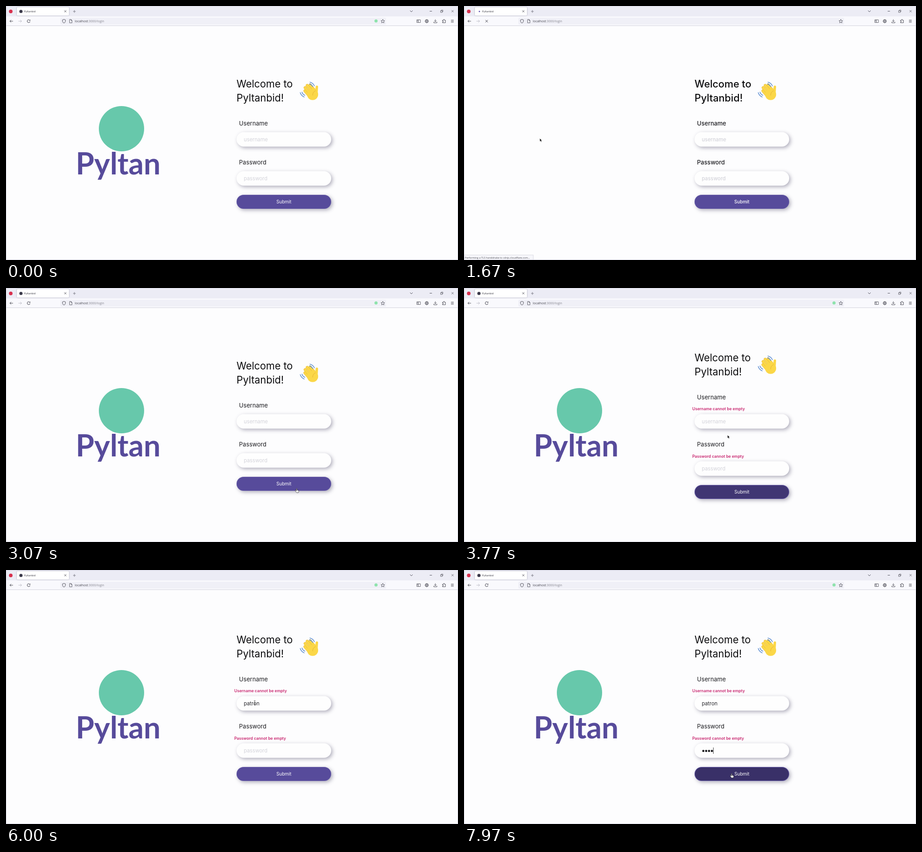
Recreate the animation shown at these times as an HTML page with a canvas. Size 998x561 px, loop 8 s.

```html
<!DOCTYPE html>
<html lang="en">
<head>
<meta charset="utf-8">
<title>Login page</title>
<style>
  html, body { margin: 0; width: 100%; height: 100%; overflow: hidden; background: #fdfdfe; }
  canvas { display: block; width: 998px; height: 561px; }
</style>
</head>
<body>
<canvas id="stage"></canvas>
<script>
const W = 998, H = 561, LOOP = 8000;
const canvas = document.getElementById('stage');
const ctx = canvas.getContext('2d');
const dpr = window.devicePixelRatio || 1;
canvas.width = W * dpr;
canvas.height = H * dpr;

const UI = '"Open Sans", "Noto Sans", sans-serif';
const PAGE = 'Inter, sans-serif';
const INK = '#3f3f4a';

// Key moments in ms
const RELOAD = 890, BLANK = 1340, FORM = 1430, STATUS = 1480, LOADED = 1740;
const REJECTED = 3370;
const userKeys = [4800, 4930, 5050, 5200, 5300, 5430];
const passKeys = [6570, 6600, 6640, 6700];
const FOCUS_USER = 4420, FOCUS_PASS = 6200;
const userName = 'patron';

// Pointer path: time, x, y; a repeated place is a rest
const path = [
  [400, 2, 150], [830, 50, 33], [960, 50, 33], [1670, 167, 292],
  [2470, 531, 308], [2920, 646, 452], [3070, 642, 443], [3420, 638, 440],
  [3570, 638, 440], [3770, 582, 325], [4400, 548, 292], [5990, 548, 292],
  [6200, 686, 400], [7000, 686, 400], [7880, 591, 450], [7970, 591, 450]
];

const clamp = v => Math.max(0, Math.min(1, v));
const smooth = v => { v = clamp(v); return v * v * (3 - 2 * v); };
const count = (times, t) => times.filter(k => t >= k).length;
const within = (t, a, b) => t >= a && t < b;

// Speed through a path point, zero where the pointer rests
function speed(i, axis) {
  const a = path[i - 1], p = path[i], b = path[i + 1];
  if (!a || !b || a[1] === p[1] || b[1] === p[1]) return 0;
  return (b[axis] - a[axis]) / (b[0] - a[0]);
}

function pointerAt(t) {
  if (t < path[0][0] || within(t, userKeys[0], 5850) || within(t, passKeys[0], 7000)) return null;
  let i = 0;
  while (i < path.length - 2 && t >= path[i + 1][0]) i++;
  const span = path[i + 1][0] - path[i][0];
  const u = clamp((t - path[i][0]) / span), s = smooth(u), v = 1 - u;
  const along = axis => path[i][axis] * (1 - s) + path[i + 1][axis] * s
    + span * u * v * (speed(i, axis) * v - speed(i + 1, axis) * u);
  return { x: along(1), y: along(2) };
}

function text(str, x, y, font, color, align = 'left') {
  ctx.font = font;
  ctx.fillStyle = color;
  ctx.textAlign = align;
  ctx.fillText(str, x, y);
}

function rect(x, y, w, h, color) {
  ctx.fillStyle = color;
  ctx.fillRect(x, y, w, h);
}

function pill(x, y, w, h, r, color) {
  ctx.beginPath();
  ctx.roundRect(x, y, w, h, r);
  ctx.fillStyle = color;
  ctx.fill();
}

function dot(x, y, r, color) {
  ctx.beginPath();
  ctx.arc(x, y, r, 0, Math.PI * 2);
  ctx.fillStyle = color;
  ctx.fill();
}

function ring(x, y, r, a, b, color = INK, w = 0.9) {
  ctx.beginPath();
  ctx.arc(x, y, r, a, b);
  ctx.strokeStyle = color;
  ctx.lineWidth = w;
  ctx.stroke();
}

function draw(d, x, y, stroke = INK, w = 0.9, fill) {
  ctx.save();
  ctx.translate(x, y);
  const p = new Path2D(d);
  if (fill) { ctx.fillStyle = fill; ctx.fill(p); }
  if (stroke) { ctx.strokeStyle = stroke; ctx.lineWidth = w; ctx.stroke(p); }
  ctx.restore();
}

const CROSS = 'M-2.3-2.3 2.3 2.3M2.3-2.3-2.3 2.3';
const ARROW = 'M3.5 0H-3.5M-.5-3-3.5 0-.5 3';

function browser(t) {
  const loading = within(t, RELOAD, LOADED);
  rect(0, 0, W, 23, '#ececf5');
  rect(0, 23, W, 20, '#f9f9fd');
  rect(0, 43, W, 1, '#d2d2dc');

  // Tab strip
  dot(10.5, 12, 4, '#d8324f');
  ctx.save();
  ctx.shadowColor = 'rgba(70,70,100,.45)';
  ctx.shadowBlur = 3 * dpr;
  pill(24, 2.5, 115, 18.5, 2, '#fff');
  ctx.restore();
  if (loading) dot(34 + 2.5 * Math.sin((t - 1670) / 800 * Math.PI * 2), 12, 1.5, '#5b4bb0');
  else dot(33, 12, 3.6, '#3a394a');
  text('Pyltanbid', 40, 14.2, '5.8px ' + UI, '#33333d');
  draw(CROSS, 131, 11.7, INK, 0.8);
  draw('M-3 0H3M0-3V3', 151, 12, '#666672', 0.8);
  draw('M-3-1.5 0 1.5 3-1.5', 895, 11.5);
  draw('M-2.5 0H2.5', 938, 11.5);
  draw('M-2.5-1H1.2V2.7H-2.5ZM-1-1V-2.5H2.7V1.2H1.2', 962, 11.5, INK, 0.7);
  draw(CROSS, 986, 11.5, INK, 0.7);

  // Toolbar
  draw(ARROW, 12, 33.5);
  ctx.save();
  ctx.translate(62, 0);
  ctx.scale(-1, 1);
  draw(ARROW, 31, 33.5, '#b9b9c3');
  ctx.restore();
  if (loading) draw('M-2.7-2.7 2.7 2.7M2.7-2.7-2.7 2.7', 50, 33.5, INK, 1);
  else {
    ring(50, 33.5, 3.2, 0.2, 5.3, INK, 1);
    draw('M.8-1H3.6V-3.8Z', 50, 33.5, null, 0, INK);
  }
  pill(120, 26, 719, 15, 2.5, '#f0f0f7');
  draw('M0-4 3.3-2.7V0Q3 3 0 4.2-3 3-3.3 0V-2.7Z', 128, 33.5);
  draw('M-2.7-3.7H.8L2.7-1.8V3.7H-2.7ZM.6-3.5V-1.6H2.6', 143, 33.5, INK, 0.8);
  const font = '6.9px ' + UI;
  text('localhost', 152, 36, font, '#45454f');
  const hostWidth = ctx.measureText('localhost').width;
  text(':3000/login', 152 + hostWidth, 36, font, '#85858f');
  if (!loading) dot(817, 33, 3.5, '#8fe3ad');
  draw('M0-4 1.2-1.3 4.1-1 1.9.9 2.6 3.8 0 2.3-2.6 3.8-1.9.9-4.1-1-1.2-1.3Z', 832, 33.5, INK, 0.8);
  draw('M-4-3H4V3H-4ZM-.6-3V3M-3-1.4H-1.6M-3 .2H-1.6', 911, 33.5, INK, 0.8);
  ring(929, 33.5, 1.3, 0, 7);
  ring(929, 33.5, 3.1, 0, 7, INK, 1);
  for (let i = 0; i < 8; i++) {
    const a = i * Math.PI / 4;
    dot(929 + 3.7 * Math.cos(a), 33.5 + 3.7 * Math.sin(a), 0.7, INK);
  }
  draw('M0-4V1.2M-2.4-1.2 0 1.2 2.4-1.2M-3.5 1.5V3.6H3.5V1.5', 948, 33.5);
  draw('M-3.3-1.7H-1V-2.7A1.1 1.1 0 0 1 1.2-2.7V-1.7H3.3V3.8H-3.3V2.2H-2.2A1 1 0 0 0-2.2.2H-3.3Z', 967, 33.2);
  draw('M-3-2.5H3M-3 0H3M-3 2.5H3', 985.5, 33.5);
}

function hand(y) {
  ctx.save();
  ctx.translate(0, y);
  ctx.lineCap = 'round';
  const skin = '#fbd748', crease = '#e6b536';
  const limb = (x, y, dx, dy, w, color) => {
    ctx.beginPath();
    ctx.moveTo(x, y);
    ctx.lineTo(x + dx, y + dy);
    ctx.strokeStyle = color;
    ctx.lineWidth = w;
    ctx.stroke();
  };
  for (const [x, y] of [[660, 187.5], [660.5, 180.5], [665, 175.5], [671.5, 174.5]]) {
    limb(x, y, 11, 13, 6.4, crease);
    limb(x, y, 11, 13, 5.2, skin);
  }
  limb(686.3, 178.5, -1, 14, 5.6, skin);
  dot(677, 195.5, 12.2, skin);
  draw('M683.5 187Q677 190 677 197', 0, 0, crease, 1);
  for (const r of [10, 14]) ring(668, 182, r, -1.35, -0.4, '#5a8bd0', 1.5);
  for (const r of [11, 15]) ring(664, 187, r, 1.95, 2.85, '#5a8bd0', 1.5);
  ctx.restore();
}

function box(y, h, color) {
  ctx.save();
  ctx.shadowColor = 'rgba(70,65,95,.42)';
  ctx.shadowBlur = 8 * dpr;
  ctx.shadowOffsetX = ctx.shadowOffsetY = 3 * dpr;
  pill(509, y, 209, h, h / 2, color);
  ctx.restore();
}

function caret(t, x, y, since) {
  if ((t - since) % 1060 < 530) rect(x, y - 7, 0.9, 14, '#222');
}

function buttonColor(t) {
  const k = smooth((t - 3050) / 400) - smooth((t - 3650) / 400) + smooth((t - 7540) / 400);
  const mix = (a, b) => Math.round(a + (b - a) * k);
  return `rgb(${mix(87, 57)},${mix(75, 48)},${mix(155, 104)})`;
}

function logo() {
  dot(255, 271, 50, '#67c8ab');
  text('Pyltan', 154, 371.5, '700 66px Lato, sans-serif', '#574b9b');
}

function form(t) {
  const shift = t >= REJECTED ? 18 : 0;
  const weight = within(t, FORM, LOADED) ? 500 : 400;
  const type = size => `${weight} ${size}px ${PAGE}`;
  const hint = '#d3d3da', paper = '#fefefe';

  text('Welcome to', 509, 180 - shift, type(22.2), '#0c0c0e');
  text('Pyltanbid!', 509, 211 - shift, type(22.2), '#0c0c0e');
  hand(-shift);
  text('Username', 514.5, 264 - shift, type(13.1), '#1c1c20');
  text('Password', 514.5, 350, type(13.1), '#1c1c20');
  if (shift) {
    const bold = '600 8.7px ' + PAGE;
    text('Username cannot be empty', 504, 270.2, bold, '#c8266f');
    text('Password cannot be empty', 504, 374.7, bold, '#c8266f');
  }

  box(278.5, 32, paper);
  const typed = userName.slice(0, count(userKeys, t));
  text(typed || 'username', 525, 298.5, type(11.3), typed ? '#26262b' : hint);
  if (within(t, FOCUS_USER, FOCUS_PASS)) {
    const x = 525 + ctx.measureText(typed).width;
    caret(t, x, 294.5, typed ? userKeys[typed.length - 1] : FOCUS_USER);
  }

  box(364.8 + shift, 32, paper);
  const dots = count(passKeys, t);
  if (!dots) text('password', 525, 384.5 + shift, type(11.3), hint);
  for (let i = 0; i < dots; i++) dot(528.4 + 6.3 * i, 399.7, 2.4, '#17171a');
  if (t >= FOCUS_PASS) caret(t, 525 + 6.3 * dots, 399, dots ? passKeys[dots - 1] : FOCUS_PASS);

  box(417 + shift, 31, '#6358a6');
  pill(510, 418 + shift, 207, 29, 14.5, buttonColor(t));
  text('Submit', 613.5, 436.4 + shift, type(10), '#fff', 'center');
}

function pointer(t) {
  const p = pointerAt(t);
  if (!p) return;
  const { x, y } = p;
  const shift = t >= REJECTED ? 18 : 0;
  const pageShown = !within(t, BLANK, FORM);
  const over = (top, bottom) => pageShown && x > 509 && x < 718 && y > top && y < bottom;
  if (over(417 + shift, 448 + shift)) {
    draw('M-.8 0Q0-1 .8 0V3.4L4 4.3Q4.8 4.8 4.4 6.5L3.6 9H-.4L-3 5.8Q-3-.1-.8 5.4Z', x, y, '#222', 0.7, '#fff');
  } else if (over(278, 311) || over(365 + shift, 397 + shift)) {
    draw('M-1.8-4.2H-.5L0-3.8.5-4.2H1.8M0-3.8V3.8M-1.8 4.2H-.5L0 3.8.5 4.2H1.8', x, y, '#333', 0.8);
  } else {
    draw('M0 0V7L1.6 5.6 2.8 8.2 4 7.6 2.8 5.2H4.9Z', x, y, '#fff', 0.5, '#08080a');
  }
}

function render(t) {
  ctx.setTransform(dpr, 0, 0, dpr, 0, 0);
  rect(0, 0, W, H, '#fdfdfe');
  browser(t);
  if (t < BLANK || t >= LOADED) logo();
  if (!within(t, BLANK, FORM)) form(t);
  if (within(t, STATUS, LOADED)) {
    rect(0, 549.5, 153.5, 11, '#d9d9e2');
    rect(0, 550.5, 152.5, 10, '#f7f7fb');
    text('Performing a TLS handshake to cdnjs.cloudflare.com…', 2, 557.7, '5.7px ' + UI, '#4a4a54');
  }
  ctx.strokeStyle = '#d5d5e2';
  ctx.lineWidth = 1;
  ctx.strokeRect(0.5, 0.5, W - 1, H - 1);
  pointer(t);
}

const start = performance.now();
function tick() {
  render((performance.now() - start) % LOOP);
  requestAnimationFrame(tick);
}
tick();
</script>
</body>
</html>
```
